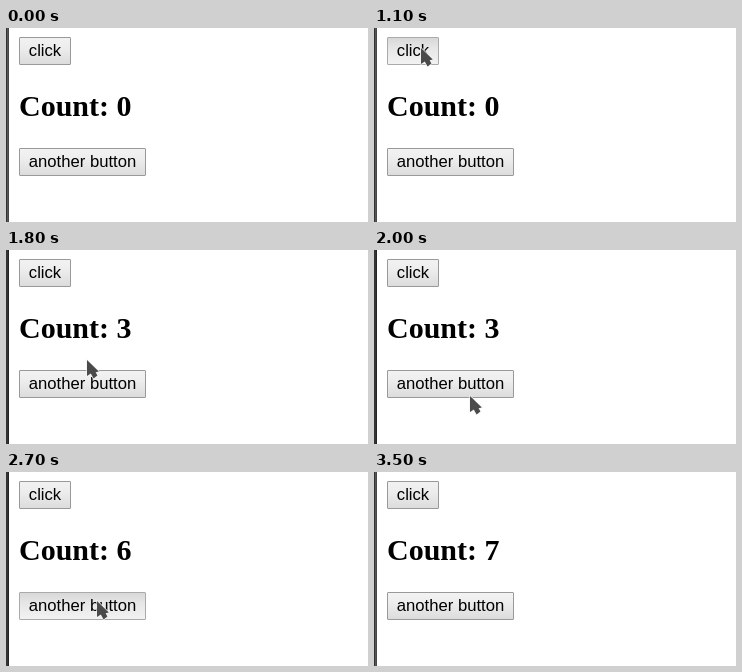
An HTML page for the animation above (3.6 s loop, 362x194 px).

```html
<!DOCTYPE html>
<html lang="en">
<head>
<meta charset="utf-8">
<title>Counter</title>
<style>
html, body { margin: 0; width: 100%; height: 100%; overflow: hidden; background: #fff; }
#stage { position: relative; width: 362px; height: 194px; overflow: hidden; background: #fff; color: #000; }
#stage > * { position: absolute; }
#edge { left: 0; top: 0; width: 3px; height: 194px; background: linear-gradient(90deg, #333 1px, #55555a 1px 2px, #48484b 2px); }
#edge.focus { background: linear-gradient(90deg, #333 1px, #343437 1px 2px, #252528 2px); }
h2 { left: 13px; top: 61px; margin: 0; font: bold 30px/33px "Liberation Serif", "Times New Roman", serif; white-space: pre; }
.button {
  left: 13px; height: 28px; box-sizing: border-box; padding-top: 3px;
  border: 1px solid #999; border-radius: 1px;
  background: linear-gradient(#f2f2f2, #ededed 38%, #dcdcdc);
  font: 16.667px/19px "Liberation Sans", Arial, sans-serif; text-align: center; white-space: pre;
}
.button.hover { border-color: #848484; background: linear-gradient(#f4f4f4, #f0f0f0 38%, #dfdfdf); }
.button.down { border-color: #aaa; background: linear-gradient(#d8d8d8, #e6e6e6 38%, #f2f2f2); }
#click { top: 9px; width: 52px; }
#other { top: 120px; width: 127px; }
#cursor { left: 0; top: 0; overflow: visible; }
</style>
</head>
<body>
<div id="stage">
  <div id="edge"></div>
  <div id="click" class="button">click</div>
  <h2>Count: <span id="count">0</span></h2>
  <div id="other" class="button">another button</div>
  <svg id="cursor" width="14" height="21">
    <path d="M1 1V17L4.8 14.6L7.6 19.5L11.4 16.4L9.6 13.2L12.8 12.6Z" fill="#4a4a4a" stroke="#f4f4f4" stroke-width="1.4" stroke-linejoin="round" paint-order="stroke"/>
  </svg>
</div>
<script>
const LOOP = 3600, STEP = 100;
const $ = id => document.getElementById(id);

// The pointer glides straight from one stop to the next.
const stops = [
  { t: 500, x: 216, y: 116 }, { t: 700, x: 27, y: 42 }, { t: 900, x: 46, y: 19 },
  { t: 1600, x: 46, y: 19 }, { t: 1900, x: 97, y: 154 }, { t: 2200, x: 90, y: 128 }
];

// Bursts of clicks: first release, time between releases, number, time held.
const bursts = [
  { id: "click", first: 1200, gap: 150, n: 3, hold: 100 },
  { id: "other", first: 2350, gap: 150, n: 3, hold: 100 },
  { id: "other", first: 3000, gap: 0, n: 1, hold: 500 }
];
const clicks = bursts.flatMap(({ id, first, gap, n, hold }) =>
  Array.from({ length: n }, (_, i) => {
    const up = first + i * gap;
    return { id, up, down: up - hold };
  }));

function pointerAt(t) {
  const next = stops.findIndex(s => s.t > t);
  if (next === 0) return stops[0];
  if (next < 0) return stops[stops.length - 1];
  const a = stops[next - 1], b = stops[next];
  const u = (t - a.t) / (b.t - a.t);
  return { x: Math.round(a.x + (b.x - a.x) * u), y: Math.round(a.y + (b.y - a.y) * u) };
}

function isOver(el, p) {
  const inset = 3;
  const x = p.x - el.offsetLeft, y = p.y - el.offsetTop;
  return x > inset && x < el.offsetWidth - inset && y > inset && y < el.offsetHeight - inset;
}

function draw(time) {
  const t = Math.floor(time % LOOP / STEP) * STEP;
  const p = pointerAt(t);
  const visible = t >= 400 && t < 3100;
  $("cursor").style.display = visible ? "block" : "none";
  $("cursor").style.transform = `translate(${p.x}px, ${p.y}px)`;

  for (const id of ["click", "other"]) {
    const down = clicks.some(c => c.id === id && c.down <= t && t < c.up);
    const hover = visible && isOver($(id), p);
    $(id).className = "button" + (down ? " down" : hover ? " hover" : "");
  }
  $("count").textContent = clicks.filter(c => c.up <= t).length;
  $("edge").className = t >= clicks[0].up && t < 3500 ? "focus" : "";
}

const start = performance.now();
function tick() {
  draw(performance.now() - start);
  requestAnimationFrame(tick);
}
tick();
</script>
</body>
</html>
```
